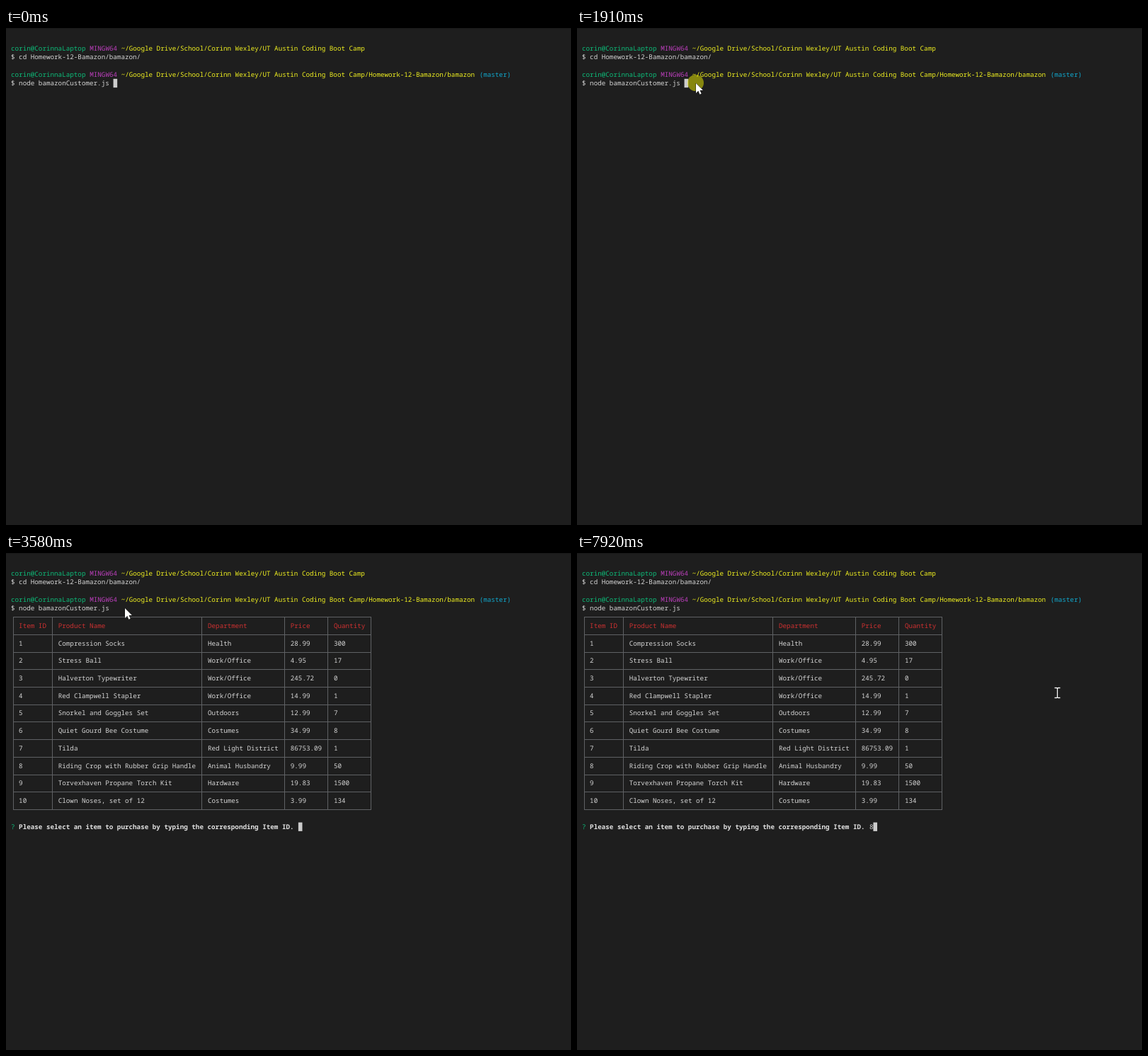
An HTML page for the animation above (8 s loop, 798 by 702 pixels).

```html
<!DOCTYPE html>
<html lang="en">
<head>
<meta charset="utf-8">
<title>Terminal session</title>
<style>
html, body { margin: 0; width: 100%; height: 100%; overflow: hidden; background: #1e1e1e; }
svg { display: block; width: 100%; height: 100%; }
text {
  font-family: "Noto Sans Mono", "DejaVu Sans Mono", monospace;
  font-size: 9.267px;
  text-rendering: geometricPrecision;
  white-space: pre;
}
</style>
</head>
<body>
<svg id="stage" viewBox="0 0 798 702">
  <rect width="798" height="1" fill="#181818"/>
  <g id="screen"></g>
  <g id="table"></g>
  <g id="question"></g>
  <g id="answer"></g>
  <rect id="caret" width="5.6" height="12.35" fill="#ccc"/>
  <circle id="click" cx="167.5" cy="77.5" r="11.5" fill="#ff0" fill-opacity=".47"/>
  <path id="arrow" d="M0 0V13.9L3.3 10.8L5.4 15.7L7.7 14.7L5.6 9.9H10Z" fill="#fff" stroke="#000" stroke-width=".8" paint-order="stroke"/>
  <g id="beam" fill="none">
    <path d="M-4 -7H-1L0 -6.4L1 -7H4M-4 7H-1L0 6.4L1 7H4M0 -6.4V6.4" stroke="#000" stroke-width="2.6"/>
    <path d="M-4 -7H-1L0 -6.4L1 -7H4M-4 7H-1L0 6.4L1 7H4M0 -6.4V6.4" stroke="#fff" stroke-width="1.4"/>
  </g>
</svg>
<script>
const LOOP = 8000, LEFT = 7, CELL = 5.56, LINE = 12.35;
const C = { green: '#0dbc79', magenta: '#bc3fbc', yellow: '#f0f020', cyan: '#11a8cd',
            red: '#cd3131', white: '#d4d4d4', rule: '#5f6164' };
const $ = id => document.getElementById(id);

function add(parent, tag, attrs, content = '') {
  const el = document.createElementNS('http://www.w3.org/2000/svg', tag);
  for (const k in attrs) el.setAttribute(k, attrs[k]);
  el.textContent = content;
  return parent.appendChild(el);
}
const colX = col => LEFT + col * CELL;
const write = (parent, col, row, str, fill = C.white, weight = 400) =>
  add(parent, 'text', { x: colX(col), y: 31.8 + row * LINE, fill, 'font-weight': weight }, str);

// Prompts
const home = '~/Google Drive/School/Corinn Wexley/UT Austin Coding Boot Camp';
const repo = home + '/Homework-12-Bamazon/bamazon';
function prompt(row, path, command) {
  write($('screen'), 0, row, 'corin@CorinnaLaptop', C.green);
  write($('screen'), 20, row, 'MINGW64', C.magenta);
  write($('screen'), 28, row, path, C.yellow);
  write($('screen'), 0, row + 1, '$ ' + command);
}
prompt(0, home, 'cd Homework-12-Bamazon/bamazon/');
prompt(3, repo, 'node bamazonCustomer.js');
write($('screen'), 29 + repo.length, 3, '(master)', C.cyan);

// Table
const rows = `Item ID|Product Name|Department|Price|Quantity
1|Compression Socks|Health|28.99|300
2|Stress Ball|Work/Office|4.95|17
3|Halverton Typewriter|Work/Office|245.72|0
4|Red Clampwell Stapler|Work/Office|14.99|1
5|Snorkel and Goggles Set|Outdoors|12.99|7
6|Quiet Gourd Bee Costume|Costumes|34.99|8
7|Tilda|Red Light District|86753.09|1
8|Riding Crop with Rubber Grip Handle|Animal Husbandry|9.99|50
9|Torvexhaven Propane Torch Kit|Hardware|19.83|1500
10|Clown Noses, set of 12|Costumes|3.99|134`.split('\n').map(r => r.split('|'));
const edges = [0, 10, 48, 69, 80, 91];
const ruleX = [10, 65, 276, 393, 454, 515];
for (const x of ruleX)
  add($('table'), 'rect', { x, y: 90, width: 1, height: 273, fill: C.rule });
for (let k = 0; k <= rows.length; k++)
  add($('table'), 'rect', { x: 10, y: Math.round(90.25 + 2 * LINE * k), width: 506, height: 1, fill: C.rule });
rows.forEach((cells, r) => cells.forEach((s, c) =>
  write($('table'), edges[c] + 2, 6 + 2 * r, s, r ? C.white : C.red)));

// Question
write($('question'), 0, 29, '?', C.green);
write($('question'), 2, 29, 'Please select an item to purchase by typing the corresponding Item ID.', '#e0e0e0', 700);
write($('answer'), 73, 29, '8');

// [start ms, column, row]
const caretSteps = [[0, 26, 4], [3050, 0, 5], [3510, 0, 29], [3580, 73, 29], [7920, 74, 29]];

// [start ms, x, y]
const pointerSteps = [
  [500, 603, 579], [570, 520, 497], [640, 430, 405], [720, 345, 317], [790, 270, 248], [870, 214, 204],
  [940, 174, 182], [1020, 155, 171], [1090, 159, 164], [1170, 172, 159], [1240, 187, 158],
  [1310, 197, 153], [1410, 192, 135], [1490, 181, 109], [1570, 172, 88], [1650, 168, 78],
  [5440, 169, 78.5], [5560, 190, 84], [5640, 255, 100], [5720, 350, 122], [5800, 455, 147],
  [5880, 545, 168], [5960, 608, 184], [6030, 642.5, 193], [6190, 678.5, 197.5]
];

const at = (steps, t) => steps.filter(s => s[0] <= t).pop();
const show = (id, on) => $(id).setAttribute('visibility', on ? 'visible' : 'hidden');

function render(t) {
  const [, col, row] = at(caretSteps, t);
  $('caret').setAttribute('x', colX(col));
  $('caret').setAttribute('y', 22.4 + row * LINE);
  show('table', t >= 3510);
  show('question', t >= 3580);
  show('answer', t >= 7920);
  show('click', t >= 1910 && t < 1980);
  const p = at(pointerSteps, t);
  show('arrow', p && t < 5440);
  show('beam', t >= 5440);
  if (p) for (const id of ['arrow', 'beam'])
    $(id).setAttribute('transform', `translate(${p[1]} ${p[2]})`);
}

const start = performance.now();
function tick() {
  render((performance.now() - start) % LOOP);
  requestAnimationFrame(tick);
}
tick();
</script>
</body>
</html>
```
